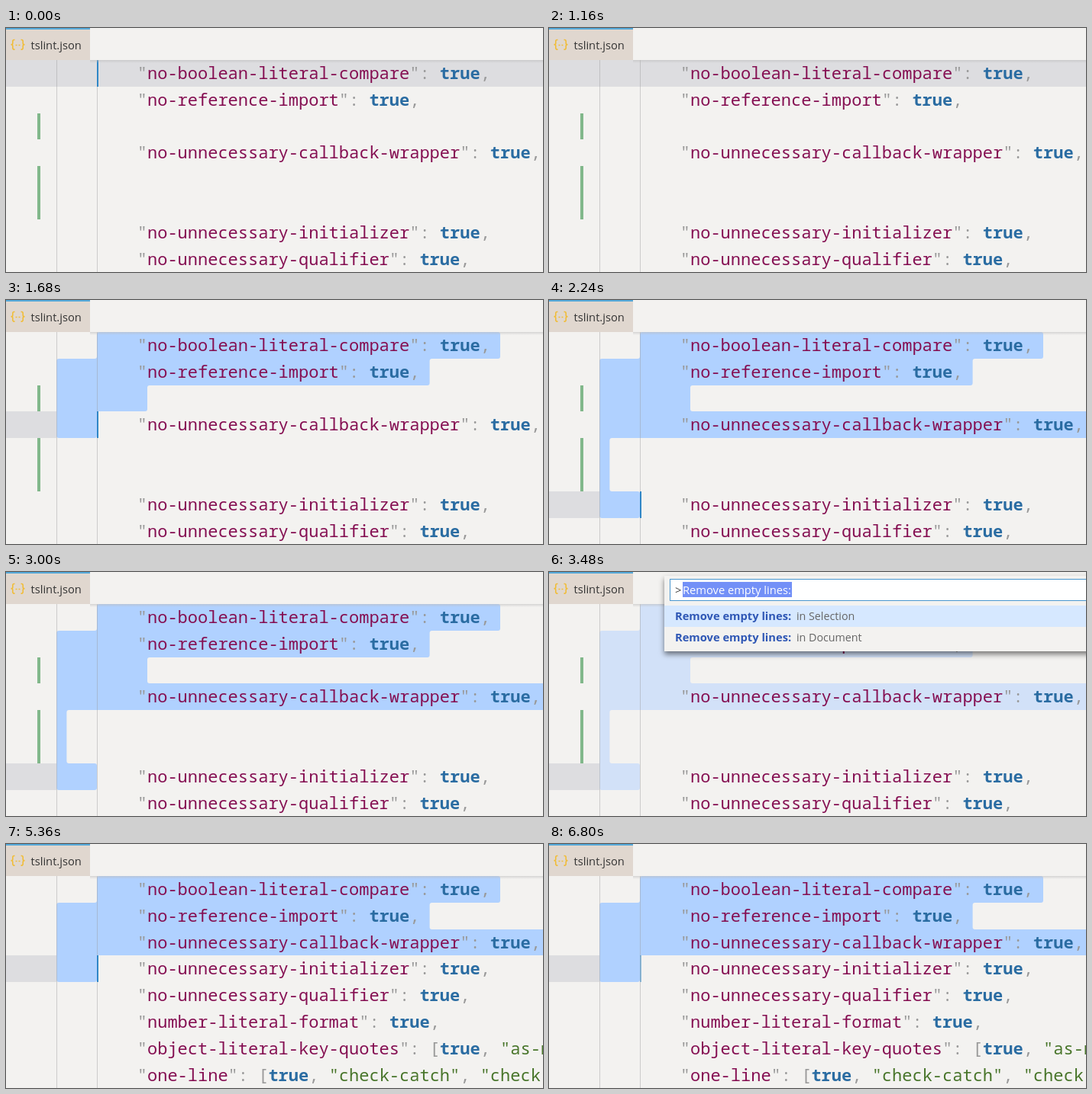
Write an HTML page that moves like this. It is 703x320 px and loops after 6.88 s.

```html
<!DOCTYPE html>
<html lang="en">
<head>
<meta charset="utf-8">
<title>Remove empty lines</title>
<style>
  html, body { margin: 0; width: 100%; height: 100%; overflow: hidden; background: #f3f2f0; }
  svg { display: block; width: 703px; height: 320px; }
  text { white-space: pre; font-family: "Open Sans", "Noto Sans", sans-serif; font-size: 14.7px; }
  #code text { font-family: "Noto Sans Mono", monospace; font-size: 22px; fill: #999; }
  #code .key { fill: #850f52; }
  #code .string { fill: #48752a; }
  #code .true { fill: #2a6ca2; font-weight: 700; }
  #selection { fill: #b0d1ff; }
  #selection.blurred { fill: #d2e1f8; }
  .match { font-weight: 700; fill: #2f57b5; }
  .detail { font-size: 14.25px; fill: #666; }
</style>
</head>
<body>
<svg viewBox="0 0 703 320">
  <defs>
    <linearGradient id="fade" x2="0" y2="1">
      <stop stop-color="#bbb" stop-opacity=".55"/>
      <stop offset="1" stop-color="#bbb" stop-opacity="0"/>
    </linearGradient>
    <filter id="shadow" x="-5%" y="-20%" width="110%" height="150%">
      <feDropShadow dx="0" dy="4" stdDeviation="3.5" flood-color="#000" flood-opacity=".5"/>
    </filter>
  </defs>

  <rect id="lineHighlight" fill="#dddde0"/>
  <path id="selection"/>
  <path d="M66.5 42V320M119.5 42V320" stroke="#999" stroke-opacity=".42"/>
  <path id="changes" fill="#81b88b"/>
  <g id="code"></g>
  <rect id="cursor" width="2" fill="#2f86c6"/>
  <rect x="110" y="42" width="593" height="4" fill="url(#fade)"/>

  <rect width="110" height="42" fill="#e0d7cf"/>
  <rect width="110" height="2" fill="#55a8d8"/>
  <g fill="none" stroke="#f0bd3a" stroke-width="1.6">
    <path d="M11.5 15.5h-1q-1.700 0-1.700 2v2.500q0 1.800-2.300 1.800 2.300 0 2.300 1.800v2.500q0 2 1.700 2h1"/>
    <path d="M19.500 15.500h1q1.700 0 1.700 2v2.500q0 1.800 2.300 1.800-2.300 0-2.300 1.800v2.500q0 2-1.700 2h-1"/>
    <path d="M12.500 22.500h2M16.500 22.500h2"/>
  </g>
  <text x="32.500" y="28" font-size="14.5" fill="#333">tslint.json</text>

  <g id="palette">
    <rect x="151" y="5" width="570" height="99" fill="#f3f2f0" filter="url(#shadow)"/>
    <rect x="158.500" y="9.500" width="560" height="28" fill="#fff" stroke="#4a97cf"/>
    <rect x="175" y="13" width="143" height="20" fill="#7390f7"/>
    <text x="165" y="28.500" fill="#444">&gt;</text>
    <text x="175" y="28.500" fill="#fff">Remove empty lines:</text>
    <rect x="151" y="44" width="552" height="28" fill="#d6e8ff"/>
    <text class="match" x="165" y="63">Remove empty lines:</text>
    <text class="detail" x="324" y="63">in Selection</text>
    <text class="match" x="165" y="91">Remove empty lines:</text>
    <text class="detail" x="324" y="91">in Document</text>
  </g>
</svg>

<script>
const LOOP = 6880, LEFT = 66.2, CHAR = 13.2, INDENT = LEFT + 4 * CHAR;
const $ = id => document.getElementById(id);
const rowY = row => Math.round(42 + 34.8 * row);
const PAD = ' '.repeat(8);
const rule = name => `${PAD}"${name}": true,`;

const head = ['no-boolean-literal-compare', 'no-reference-import'].map(rule);
const wrapper = rule('no-unnecessary-callback-wrapper');
const tail = ['no-unnecessary-initializer', 'no-unnecessary-qualifier'].map(rule);
const before = [...head, PAD, wrapper, '', '', ...tail];
const after = [...head, wrapper, ...tail, rule('number-literal-format'),
  PAD + '"object-literal-key-quotes": [true, "as-needed"],',
  PAD + '"one-line": [true, "check-catch", "check-else"],'];

// [start, lines, cursor row, changed rows, palette open]
const scenes = [
  [0, before, 0], [1400, before, 1], [1560, before, 2], [1680, before, 3],
  [1840, before, 4], [2080, before, 5], [2240, before, 6],
  [3480, before, 6, [2, 4, 5], true], [5120, before, 6],
  [5200, after, 3, [2, 3]], [5360, after, 3, []]
].map(([start, lines, row, changed = [2, 4, 5], open = false]) =>
  ({ start, lines, row, changed, open }));

// [start, cursor opacity]
const blinks = [
  [0, 1], [80, .5], [160, 0], [600, .15], [680, .6], [760, 1],
  [1000, .85], [1080, .4], [1160, 0], [1400, 1],
  [2840, .85], [2920, .4], [3000, 0], [5120, 1],
  [5800, .85], [5880, .4], [5960, 0], [6440, .5], [6520, 1], [6800, .5]
];

function highlight(line) {
  return line.replace(/"([^"]*)"(:?)|true/g, (token, name, colon) => {
    if (token === 'true') return '<tspan class="true">true</tspan>';
    return colon ? `"<tspan class="key">${name}</tspan>":`
                 : `<tspan class="string">${token}</tspan>`;
  });
}

const renderCode = lines => lines.map((line, i) =>
  `<text x="${LEFT + CHAR * (line.length - line.trimStart().length)}" y="${rowY(i) + 25}">${highlight(line.trim())}</text>`
).join('');

function roundedPath(points, radius = 3) {
  const n = points.length;
  const toward = ([x, y], [u, v]) => {
    const length = Math.hypot(u - x, v - y);
    const k = length ? Math.min(radius, length / 2) / length : 0;
    return `${x + (u - x) * k} ${y + (v - y) * k}`;
  };
  return points.map((p, i) =>
    `${i ? 'L' : 'M'}${toward(p, points[(i + n - 1) % n])}Q${p.join(' ')} ${toward(p, points[(i + 1) % n])}`
  ).join('') + 'Z';
}

const cursorX = ({ lines, row }) => lines[row] ? INDENT : LEFT;

function selectionPath(scene) {
  const { lines, row } = scene;
  if (!row) return '';
  const spans = lines.slice(0, row).map((line, i) =>
    [i ? LEFT : INDENT, LEFT + CHAR * (line.length + 1)]);
  if (cursorX(scene) > LEFT) spans.push([LEFT, cursorX(scene)]);
  const right = spans.flatMap(([, x], i) => [[x, rowY(i)], [x, rowY(i + 1)]]);
  const left = spans.flatMap(([x], i) => [[x, rowY(i)], [x, rowY(i + 1)]]).reverse();
  const points = [...right, ...left];
  const corners = points.filter(([x], i) => {
    const prev = points.at(i - 1), next = points[(i + 1) % points.length];
    return prev[0] !== x || next[0] !== x;
  });
  return roundedPath(corners);
}

function setRect(rect, x, row) {
  rect.setAttribute('x', x);
  rect.setAttribute('y', rowY(row));
  rect.setAttribute('height', rowY(row + 1) - rowY(row));
}

let shownScene, shownLines;
function show(scene) {
  if (scene === shownScene) return;
  shownScene = scene;
  if (scene.lines !== shownLines) {
    shownLines = scene.lines;
    $('code').innerHTML = renderCode(shownLines);
  }
  setRect($('lineHighlight'), 0, scene.row);
  $('lineHighlight').setAttribute('width', scene.row ? 66 : 703);
  setRect($('cursor'), Math.round(cursorX(scene)), scene.row);
  $('selection').setAttribute('d', selectionPath(scene));
  $('selection').classList.toggle('blurred', scene.open);
  $('changes').setAttribute('d', scene.changed.map(row =>
    `M41 ${rowY(row)}H45V${rowY(row + 1)}H41Z`).join(''));
  $('palette').style.display = scene.open ? '' : 'none';
}

function frame() {
  const time = performance.now() % LOOP;
  show(scenes.findLast(scene => scene.start <= time));
  $('cursor').setAttribute('opacity', blinks.findLast(([start]) => start <= time)[1]);
  requestAnimationFrame(frame);
}
frame();
</script>
</body>
</html>
```
